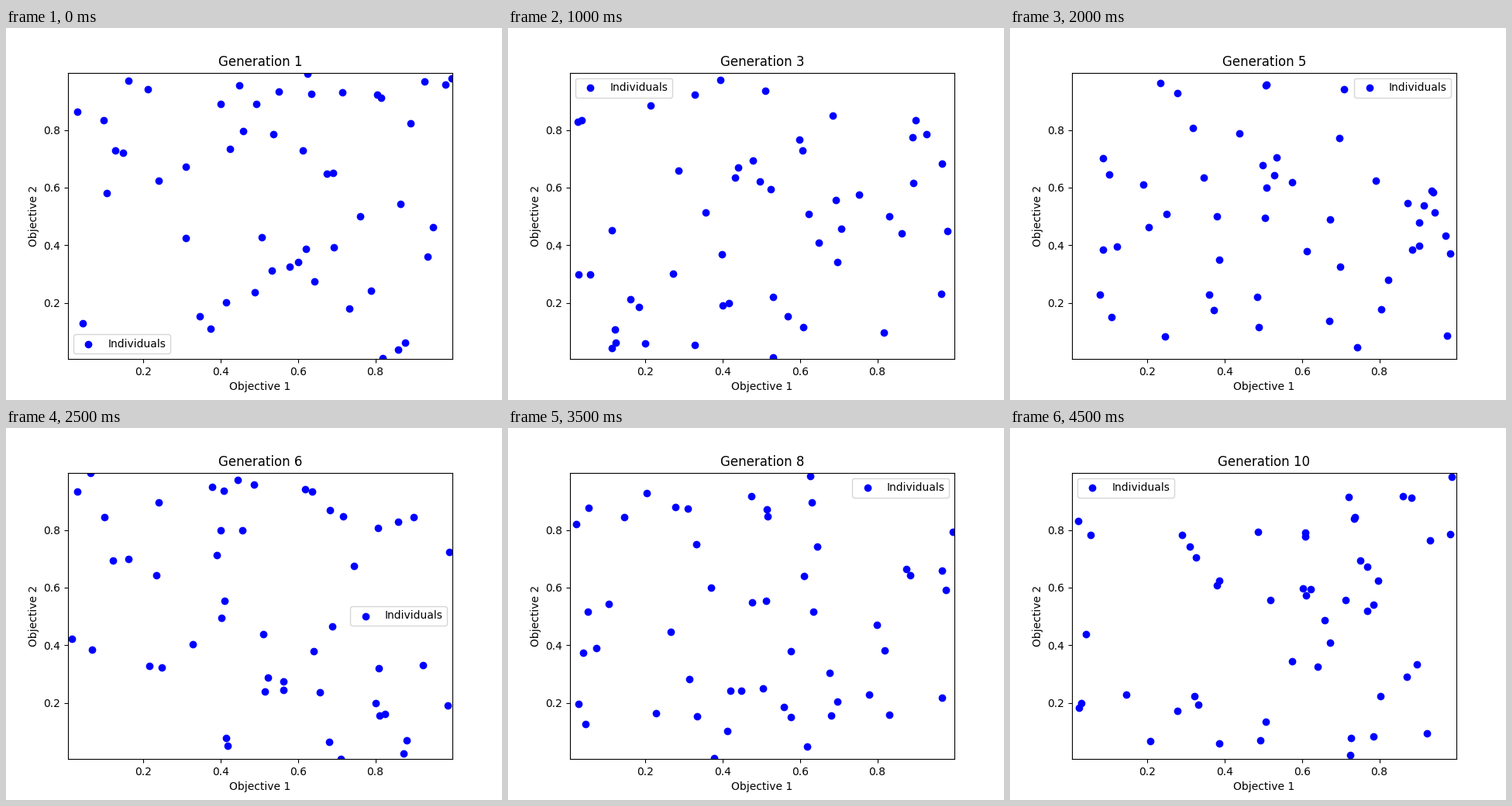
Write a matplotlib script that moves like this. It is 640x480 px and loops after 5000 ms.

```python
import numpy as np
import matplotlib.pyplot as plt
from matplotlib.animation import FuncAnimation

SIZE = 50
LOW, HIGH = 0.005, 0.999
LEGENDS = ["lower left", "upper right", "upper left", "lower left",
           "upper right", "center right", "upper right", "upper right",
           "lower left", "upper left"]


def under_legend(x, y, loc):
    row, side = loc.split()
    middle = {"lower": 0.05, "center": 0.5, "upper": 0.95}[row]
    in_side = x < 0.28 if side == "left" else x > 0.72
    return in_side and abs(y - middle) < 0.05


def population(index):
    """Fresh uniform individuals that leave the legend clear."""
    rng = np.random.default_rng(index)
    points = []
    while len(points) < SIZE:
        x, y = rng.uniform(0.015, HIGH), rng.uniform(LOW, HIGH)
        if not under_legend(x, y, LEGENDS[index]):
            points.append((x, y))
    return points


fig, ax = plt.subplots(figsize=(6.4, 4.8), dpi=100)
dots = ax.scatter([], [], color="blue", label="Individuals")
title = ax.set_title("")
ticks = [0.2, 0.4, 0.6, 0.8]
ax.set(xlim=(LOW, 0.9992), ylim=(LOW, HIGH), xticks=ticks, yticks=ticks,
       xlabel="Objective 1", ylabel="Objective 2")


def update(index):
    dots.set_offsets(population(index))
    title.set_text(f"Generation {index + 1}")
    ax.legend(loc=LEGENDS[index])
    return dots, title


anim = FuncAnimation(fig, update, frames=len(LEGENDS), interval=500,
                     repeat=True, repeat_delay=0)
plt.show()
```
